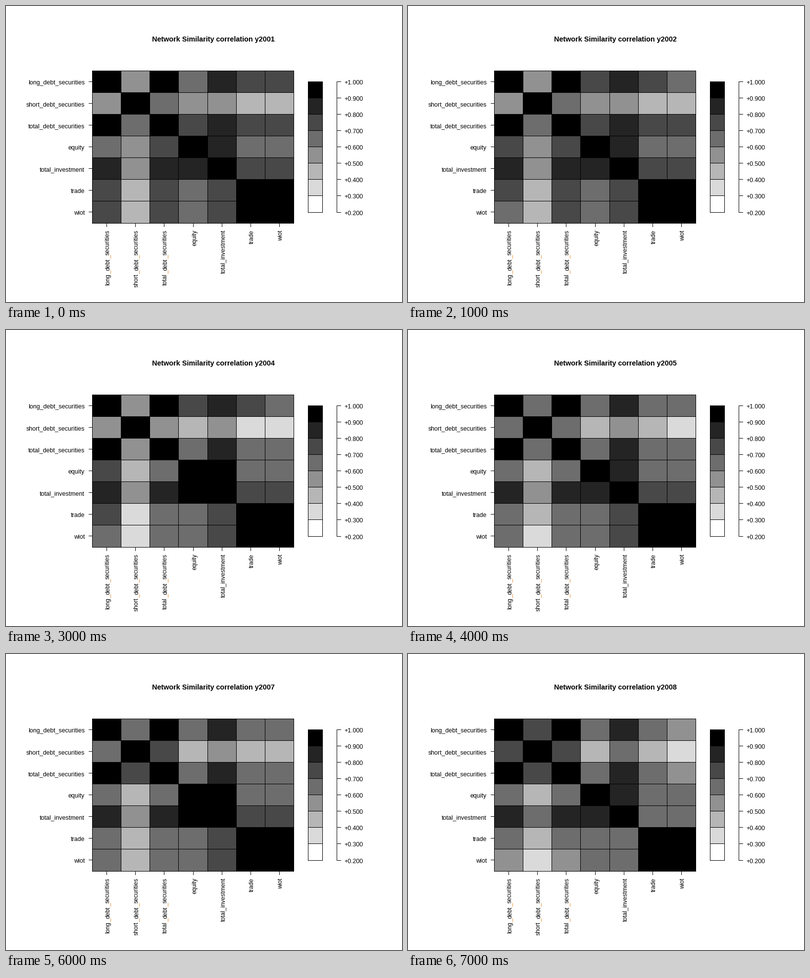
A matplotlib script for the animation above (8000 ms loop, 800 by 600 pixels).

```python
import matplotlib.pyplot as plt
from matplotlib.animation import FuncAnimation
from matplotlib.patches import Rectangle

W, H, DPI = 800, 600, 100
PX = 72 / DPI  # points per pixel
FONT = "Liberation Sans"

NAMES = ["long_debt_securities", "short_debt_securities",
         "total_debt_securities", "equity", "total_investment",
         "trade", "wiot"]
N = len(NAMES)

# Upper triangles by row: each digit is the lower bound of a 0.1 wide class
YEARS = {
    2001: "596877 65544 7877 866 77 9",
    2002: "597876 65544 7877 866 77 9",
    2003: "597977 65544 7877 866 77 9",
    2004: "597876 54533 6866 966 77 9",
    2005: "696866 64543 6866 866 77 9",
    2006: "696866 64533 6866 966 77 9",
    2007: "696866 74544 6866 966 77 9",
    2008: "796865 74643 6865 866 66 9",
}

LEFT, TOP, WIDTH, HEIGHT = 174, 131, 407, 309
KEY_X, KEY_W, KEY_TOP, KEY_H = 610, 29, 153, 265
AXIS_X = 668

fig = plt.figure(figsize=(W / DPI, H / DPI), dpi=DPI, facecolor="white")
ax = fig.add_axes([0, 0, 1, 1])
ax.set_xlim(0, W)
ax.set_ylim(H, 0)
ax.axis("off")


def shade(level):
    return str(int((9 - level) * 255 / 7) / 255)


def box(x, y, w, h, color="black", z=2):
    patch = Rectangle((x, y), w, h, facecolor=color, linewidth=0, zorder=z)
    return ax.add_patch(patch)


def label(x, y, text, size=12.45, **style):
    return ax.text(x, y, text, fontsize=size * PX, family=FONT,
                   va="baseline", **style)


def text_length(text, size):
    probe = label(0, 0, text, size)
    length = probe.get_window_extent().width
    probe.remove()
    return length


def upright(x, end, text, size=12.15):
    """Text reading upwards and ending at height end."""
    style = dict(rotation=90, rotation_mode="anchor", ha="left")
    start = end + text_length(text, size)
    if text.count("_") < 2:
        label(x, start, text, size, **style)
        return
    # Underscores carry a coloured fringe, so they are drawn as bars
    prefix, y = "", start
    for i, word in enumerate(text.split("_")):
        if i:
            low = start - text_length(prefix, size)
            prefix += "_"
            y = start - text_length(prefix, size)
            box(x + 2, y, 1, low - y, "#e8963c")
        label(x, y, word, size, **style)
        prefix += word


def x_at(i):
    return round(LEFT + WIDTH * i / N)


def y_at(i):
    return int(TOP + HEIGHT * i / N)


# Heatmap cells, grid and axes
cells = {}
for r in range(N):
    for c in range(N):
        cells[r, c] = box(x_at(c), y_at(r), x_at(c + 1) - x_at(c),
                          y_at(r + 1) - y_at(r), z=1)
for i in range(N + 1):
    box(x_at(i), TOP, 1, HEIGHT + 1)
    box(LEFT, y_at(i), WIDTH + 1, 1)
for i, name in enumerate(NAMES):
    x, y = x_at(i + 0.5), y_at(i + 0.5)
    box(LEFT - 7, y, 7, 1)
    label(159, y + 6, name, ha="right")
    box(x, TOP + HEIGHT, 1, 8)
    upright(x + 6, 454, name)

# Colour key with its scale
for i in range(9):
    y = int(KEY_TOP + KEY_H * i / 8)
    if i < 8:
        below = int(KEY_TOP + KEY_H * (i + 1) / 8)
        box(KEY_X, y, KEY_W, below - y, shade(9 - i), z=1)
    box(KEY_X, y, KEY_W + 1, 1)
    box(AXIS_X, y, 9, 1)
    label(683, y + 6, f"{1 - i / 10:+.3f}", ha="left")
for x in (KEY_X, KEY_X + KEY_W, AXIS_X):
    box(x, KEY_TOP, 1, KEY_H + 1)

title = label(295, 72, "", 14.4, weight="bold", ha="left")


def draw(frame):
    year = 2001 + frame
    title.set_text(f"Network Similarity correlation y{year}")
    for i in range(N):
        cells[i, i].set_facecolor(shade(9))
    for r, row in enumerate(YEARS[year].split()):
        for c, digit in enumerate(row, r + 1):
            for key in ((r, c), (c, r)):
                cells[key].set_facecolor(shade(int(digit)))
    return [title, *cells.values()]


anim = FuncAnimation(fig, draw, frames=len(YEARS), interval=1000, repeat=True)
plt.show()
```
